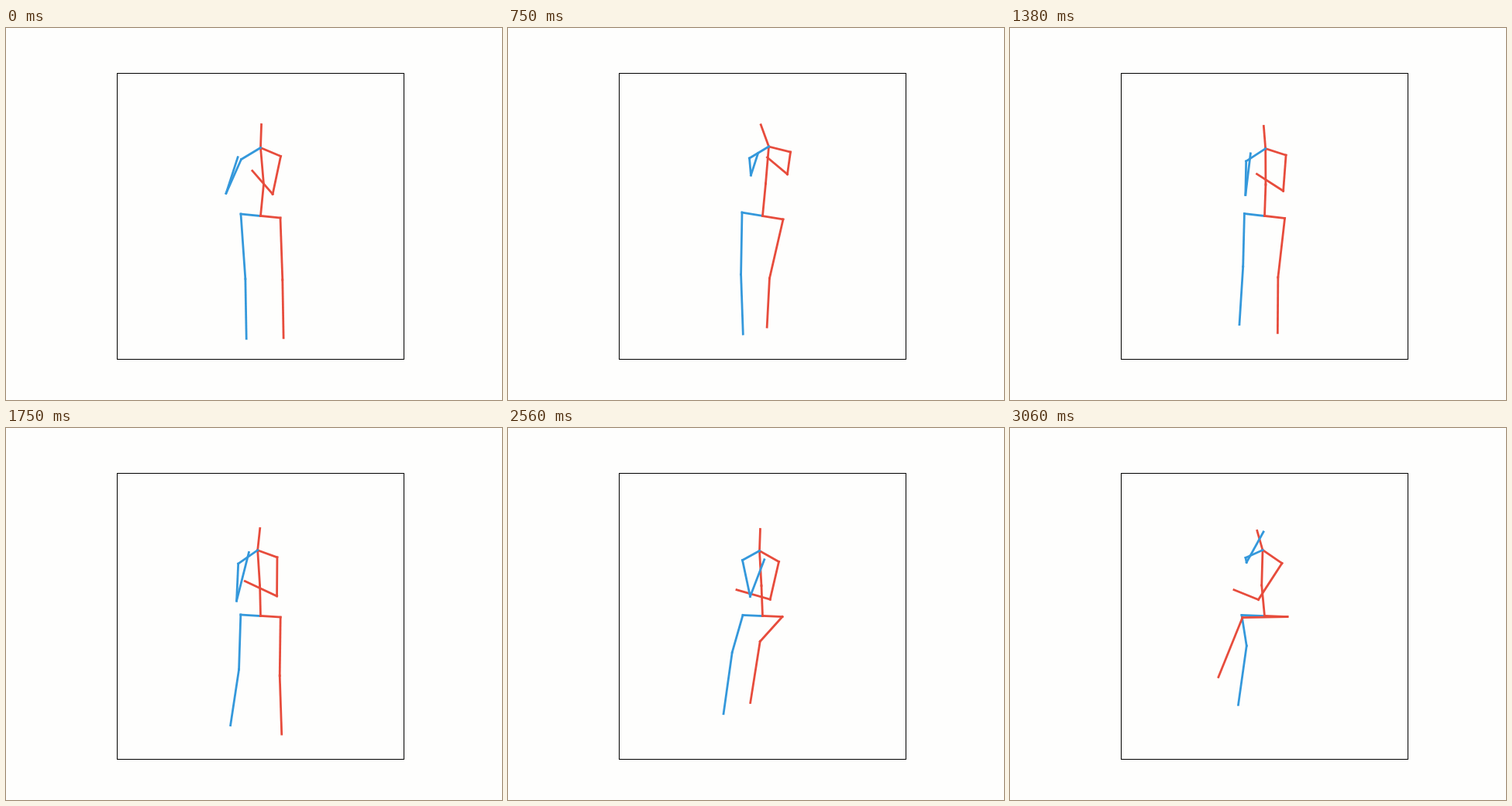
Animation of 640 by 480 pixels, one loop 3120 ms. Source, as an HTML page with a canvas:

```html
<!DOCTYPE html>
<html lang="en">
<head>
<meta charset="utf-8">
<title>Stick figure</title>
<style>
html, body { margin: 0; width: 100%; height: 100%; overflow: hidden; background: #fefefd; }
canvas { display: block; }
</style>
</head>
<body>
<canvas id="stage" width="640" height="480"></canvas>
<script>
const ctx = document.getElementById('stage').getContext('2d');
const LOOP = 3120, STEPS = 50;
const BLUE = '#3498db', RED = '#e74c3c';

// Eased 0..1 between two steps
function ramp(step, from, to) {
  const u = Math.min(1, Math.max(0, (step - from) / (to - from)));
  return u * u * (3 - 2 * u);
}

// Point at a distance; 0 degrees is straight down, positive turns right
function bone([x, y], angle, length) {
  const a = angle * Math.PI / 180;
  return [x + length * Math.sin(a), y + length * Math.cos(a)];
}

const shift = ([x, y], dx, dy) => [x + dx, y + dy];

function chain(color, points) {
  ctx.strokeStyle = color;
  for (let i = 1; i < points.length; i++) {
    ctx.beginPath();
    ctx.moveTo(...points[i - 1]);
    ctx.lineTo(...points[i]);
    ctx.stroke();
  }
}

// Two-bone limb, starting with the line from the trunk
function limb(color, trunk, root, upper, lower) {
  const middle = bone(root, ...upper);
  chain(color, [trunk, root, middle, bone(middle, ...lower)]);
}

function drawFigure(step) {
  const turn = ramp(step, 0, 12) - ramp(step, 12, 30);
  const lift = ramp(step, 5, 12) - ramp(step, 12, 34);
  const walk = ramp(step, 12, 34);
  const bend = ramp(step, 34, 41);
  const sit = ramp(step, 41, 49);
  const fold = turn * turn; // foreshortening of the raised arms
  const swing = turn * (1 - turn);

  const pelvis = [328, 242];
  const neck = shift(pelvis, 8 * turn - 5 * walk + bend + 1.5 * sit,
    -88 - 1.5 * turn + 4 * walk - sit);
  const waist = [
    (pelvis[0] + neck[0]) / 2 + 4 - 4 * turn - 3.5 * walk - 3 * sit,
    (pelvis[1] + neck[1]) / 2 + 3
  ];
  const head = bone(neck, 178 + 22 * turn - 6 * walk + 6 * bend + 18 * sit,
    30 - 2 * walk - 2 * sit);

  const hipX = 25.5 + lift + 4 * sit;
  const hipY = 2.5 + 2 * lift - 1.5 * walk;

  limb(BLUE, pelvis, shift(pelvis, -hipX, -hipY),
    [4 - 5 * lift - 6 * walk - 14 * bend + 25 * sit,
      84 - 4 * lift - 8 * walk - 40 * lift * walk - 26 * bend - 10 * sit],
    [1 + lift - 12 * walk + 3 * bend, 77 - 5 * walk + 8 * bend - 3 * sit]);

  limb(RED, pelvis, shift(pelvis, hipX, hipY),
    [2 - 15 * lift - 44 * bend - 47 * sit,
      80 - 2 * lift - 5 * walk - 32 * bend + 15 * sit],
    [1 - 4 * lift + 2 * walk - 12 * bend - 13 * sit,
      75 - 12 * lift * lift + walk + 4 * bend + 3 * sit]);

  chain(RED, [pelvis, waist, neck, head]);

  limb(RED, neck, shift(neck, 26 + 2 * turn - walk, 11 - 4 * turn - 2 * walk + 5 * bend + 3 * sit),
    [-12 + 4 * turn + 14 * walk - 15 * bend - 20 * sit, 50 - 21 * fold + 6 * sit],
    [-139 + 9 * turn + 29 * walk + 4 * bend - 6 * sit,
      40 - 6 * turn + 7 * walk - 2 * bend - 11 * sit]);

  limb(BLUE, neck, shift(neck, -25 + 3 * bend, 15 + 3 * walk - 6 * bend - 2 * sit),
    [-24 + 29 * turn + 25 * walk + 11 * bend, 48 - 26 * fold - 42 * sit],
    [162 + 40 * swing + 3 * walk - 6 * bend - 8 * sit,
      49 - 19 * fold + 19 * walk - 17 * bend - 6 * sit]);
}

function draw(step) {
  ctx.fillStyle = '#fefefd';
  ctx.fillRect(0, 0, 640, 480);
  ctx.lineCap = 'square';
  ctx.lineWidth = 1;
  ctx.strokeStyle = '#000';
  ctx.strokeRect(143.5, 58.5, 370, 369);

  ctx.save();
  ctx.translate(0.5, 0.5);
  ctx.lineWidth = 2.78;
  drawFigure(step);
  ctx.restore();
}

// Sixteen steps a second, with starts rounded to 10 ms
const startOf = step => Math.floor(step * 6.25 + 0.5) * 10;

function stepAt(t) {
  let step = Math.min(STEPS - 1, Math.floor(t / 62.5) + 1);
  while (startOf(step) > t) step--;
  return step;
}

const begin = performance.now();
function tick() {
  draw(stepAt((performance.now() - begin) % LOOP));
  requestAnimationFrame(tick);
}
tick();
</script>
</body>
</html>
```
